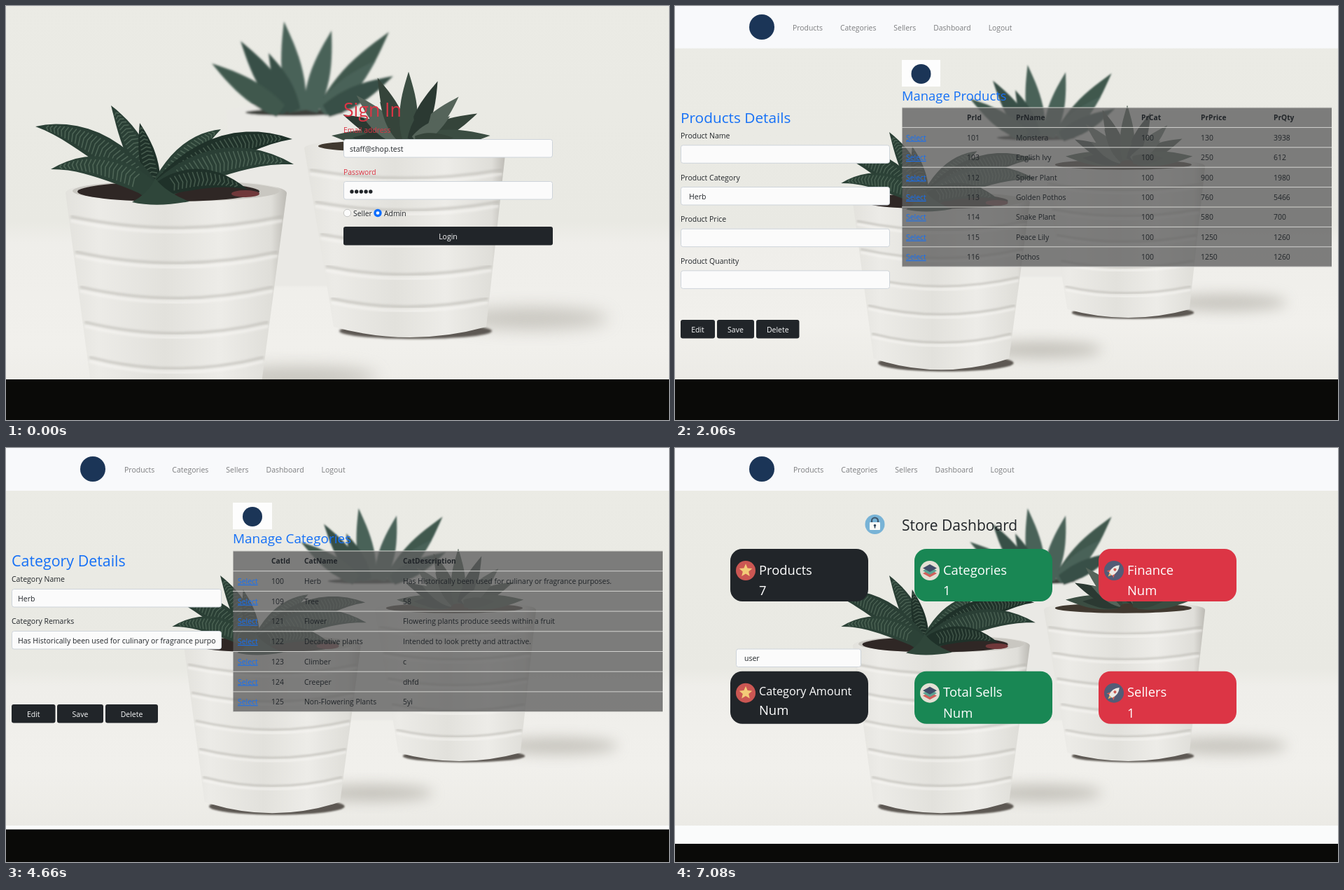
Animation of 947 by 591 pixels, one loop 8 s. Source, as an HTML page:

```html
<!DOCTYPE html>
<html lang="en">
<head>
<meta charset="utf-8">
<title>Plant shop</title>
<style>
html, body { margin: 0; width: 100%; height: 100%; overflow: hidden; background: #0a0a08; }
#stage { display: block; width: 100vw; height: 100vh; font-family: "Open Sans", "Noto Sans", sans-serif; }
</style>
</head>
<body>
<svg id="stage" viewBox="0 0 947 591" preserveAspectRatio="none"></svg>
<script>
const INK = '#212529', BLUE = '#1570f6', RED = '#dc3545', GREEN = '#198754', PALE = '#f8f9fb', NAVY = '#1b3557';
const range = n => [...Array(n).keys()];
const mix = (a, b, t) => a + (b - a) * t;

// Basic shapes
const text = (x, y, size, str, fill = INK, extra = '') =>
  `<text x="${x}" y="${y}" font-size="${size}" fill="${fill}" ${extra}>${str}</text>`;
const box = (x, y, w, h, fill, r = 0, extra = '') =>
  `<rect x="${x}" y="${y}" width="${w}" height="${h}" rx="${r}" fill="${fill}" ${extra}/>`;
const disc = (x, y, r, fill, extra = '') => `<circle cx="${x}" cy="${y}" r="${r}" fill="${fill}" ${extra}/>`;
const oval = (x, y, rx, ry, fill, extra = '') =>
  `<ellipse cx="${x}" cy="${y}" rx="${rx}" ry="${ry}" fill="${fill}" ${extra}/>`;
const path = (d, fill, extra = '') => `<path d="${d}" fill="${fill}" ${extra}/>`;

// A leaf arches from its base to its tip, widest in the lower third
function leaf(x0, y0, x1, y1, arch, fill, stripe) {
  const length = Math.hypot(x1 - x0, y1 - y0), half = 5 + 0.08 * length;
  const cx = mix(x0, x1, 0.5), cy = mix(y0, y1, 0.5) - arch * Math.abs(x1 - x0);
  const side = (t, k) => {
    const dx = mix(cx - x0, x1 - cx, t), dy = mix(cy - y0, y1 - cy, t);
    const w = k * half * Math.sin(Math.PI * mix(0.25, 1, t)) / Math.hypot(dx, dy);
    const x = mix(mix(x0, cx, t), mix(cx, x1, t), t) - dy * w;
    const y = mix(mix(y0, cy, t), mix(cy, y1, t), t) + dx * w;
    return x.toFixed(1) + ' ' + y.toFixed(1);
  };
  const steps = range(13).map(i => i / 12);
  const edge = [...steps.map(t => side(t, 1)), ...steps.reverse().map(t => side(t, -1))];
  let out = path('M' + edge.join('L') + 'Z', fill);
  if (stripe) {
    const gap = 6 / length;
    let d = '';
    for (let t = 0.15; t < 0.9; t += gap) d += `M${side(t, -0.7)}L${side(t + gap / 2, 0.1)}L${side(t, 0.7)}`;
    out += path(d, 'none', `stroke="${stripe}" stroke-width="1.6" opacity=".35"`);
  }
  return out;
}

// Leaves share one heart; spread moves each base toward its tip
const plant = (x, y, tips, { spread = 0, arch = 0, fills, stripe }) => tips.map(([tx, ty], i) =>
  leaf(x + spread * (tx - x), y, tx, ty, arch, fills[i % fills.length], stripe)).join('');
const rosette = (x, y, rx, ry, n) => range(n).map(i => {
  const a = Math.PI * i / (n - 1), r = 1 + 0.08 * Math.sin(i * 5);
  return [x - rx * r * Math.cos(a), y - ry * r * Math.sin(a)];
});

function pot(x, top, rx, ry, bottomX, bottomRx, bottom, dip) {
  const l = bottomX - bottomRx, r = bottomX + bottomRx;
  let out = oval(bottomX + 8, bottom + dip * 0.4, bottomRx, dip * 0.75, '#5d5952', 'filter="url(#soft)"') +
    path(`M${x - rx} ${top}A${rx} ${ry} 0 0 1 ${x + rx} ${top}L${r} ${bottom}Q${bottomX} ${bottom + 2 * dip} ${l} ${bottom}Z`,
      'url(#glaze)');
  for (const k of range(5).map(i => 0.12 + 0.18 * i)) {
    const y = mix(top, bottom, k), from = mix(x - rx, l, k) + 3, to = mix(x + rx, r, k) - 2;
    const ring = (dy, color) => path(`M${from} ${y + dy}Q${x} ${y + dy + dip * 1.6} ${to} ${y + dy}`, 'none',
      `stroke="${color}" stroke-width="4" filter="url(#soft)" opacity=".55"`);
    out += ring(0, '#b9b7b1') + ring(6, '#f9f8f5');
  }
  return out;
}

const defs = `<defs>
  <linearGradient id="wall" x2="0" y2="1">
    <stop stop-color="#ebebe5"/><stop offset=".52" stop-color="#e9e9e3"/>
    <stop offset=".57" stop-color="#efeeea"/><stop offset=".8" stop-color="#f1f0ec"/><stop offset="1" stop-color="#eae9e4"/>
  </linearGradient>
  <linearGradient id="glaze">
    <stop stop-color="#e3e2dd"/><stop offset=".15" stop-color="#ecebe7"/><stop offset=".45" stop-color="#e2e1dc"/>
    <stop offset=".7" stop-color="#edece8"/><stop offset=".93" stop-color="#dfded9"/><stop offset="1" stop-color="#bcbab4"/>
  </linearGradient>
  <filter id="soft"><feGaussianBlur stdDeviation="1.5"/></filter>
  <filter id="hazy" x="-50%" y="-80%" width="200%" height="260%"><feGaussianBlur stdDeviation="12"/></filter>
  <g id="photo">${[
    box(-240, -20, 1210, 630, 'url(#wall)'),
    oval(750, 446, 110, 15, '#aaa79f', 'filter="url(#hazy)" opacity=".6"'),
    oval(420, 530, 110, 14, '#aaa79f', 'filter="url(#hazy)" opacity=".65"'),
    '<g filter="url(#soft)">',
    path('M315 152A90 12 0 0 1 496 152L480 400H340Z', '#eae9e5'),
    oval(412, 152, 70, 5, '#3d3f3a'),
    plant(425, 150, [[465, 35], [335, 50], [547, 37], [397, 22], [375, 67], [294, 82], [528, 78], [553, 100]],
      { spread: 0.25, fills: ['#4a6259', '#374f46', '#40584e'] }),
    '</g>',
    pot(570, 203, 144, 15, 577, 109, 458, 15),
    oval(568, 200, 122, 9, '#40382f'),
    plant(575, 192, [...rosette(575, 185, 110, 85, 9), ...rosette(570, 188, 75, 62, 7)],
      { spread: 0.15, fills: ['#3b4d42', '#2b3932', '#55645a', '#35443a'] }),
    pot(243, 267, 158, 20, 243, 121, 546, 20),
    oval(243, 264, 148, 15, '#c9c7c1'), oval(232, 265, 130, 14, '#2f2725'), oval(342, 268, 20, 5, '#70383a'),
    plant(213, 262, [[150, 142], [191, 167], [307, 176], [42, 172], [409, 190], [64, 233], [411, 226], [345, 262]],
      { spread: 0.04, arch: 0.24, fills: ['#2a3f35', '#1f3129', '#2c4237'], stripe: '#8ca58f' }),
    path('M180 280Q205 266 213 246Q228 266 262 279Q215 288 180 280Z', '#2f463a')
  ].join('')}</g></defs>`;

const photo = (x, y, s) => `<use href="#photo" transform="translate(${x} ${y}) scale(${s})"/>`;
const floor = y => box(0, y, 947, 591 - y, '#0a0a08');

// Page parts
const field = (x, y, w, value = '', pad = 9) =>
  box(x + 0.5, y + 0.5, w - 1, 25.5, '#fbfbfb', 3, 'stroke="#ced4da"') + text(x + pad, y + 17.5, 10.5, value);
const button = (x, y, w, label) =>
  box(x, y, w, 26.5, INK, 3) + text(x + w / 2, y + 17.8, 10.5, label, '#f8f9fa', 'text-anchor="middle"');

const nav = (height, size, x) => box(0, 0, 947, height, PALE) + disc(124, 30, 18, NAVY) +
  text(x, height / 2 + 4.6, size, ['Products', 'Categories', 'Sellers', 'Dashboard', 'Logout']
    .map((s, i) => `<tspan dx="${i && 25}">${s}</tspan>`).join(''), '#7c7d7f');
const badge = (y, w) => box(324, y, w, 38, '#fdfdfd') + disc(324 + w / 2, y + 20, 14, NAVY);

function table(y, pitch, cols, head, rows) {
  let out = box(324.5, y, 613.5, pitch * (rows.length + 1), '#5e5e5e', 0, 'fill-opacity=".78"');
  const row = (cells, i) => cells.map((s, c) => text(cols[c], y + 18.3 + pitch * i, i ? 10.4 : 10.2, s,
    i && !c ? BLUE : INK, i ? (c ? '' : 'text-decoration="underline"') : 'font-weight="700"')).join('');
  out += row(['', ...head], 0) + rows.map((r, i) => row(['Select', ...r], i + 1)).join('');
  for (const i of range(rows.length + 2)) out += box(324, y + pitch * i - 0.5, 614, 1, '#d3d3d0');
  return out;
}

// Dashboard icons, centred on 0,0
const icons = {
  star() {
    const pts = range(10).map(i => {
      const r = i % 2 ? 4.4 : 9.8, a = i * Math.PI / 5;
      return (r * Math.sin(a)).toFixed(1) + ' ' + (-r * Math.cos(a)).toFixed(1);
    });
    return disc(0, 0, 14, '#cb5753') + path('M' + pts.join('L') + 'Z', '#f3cb78');
  },
  stack: () => disc(0, 0, 14, '#e3e0d4') + ['#d0605a', '#5aa393', '#414e68']
    .map((c, i) => path(`M-10 ${4 - 3.7 * i}l10 -5.5l10 5.5l-10 5.5Z`, c)).join(''),
  rocket: () => disc(0, 0, 14, '#535c76') + '<g transform="rotate(45)">' +
    path('M-4 2L-7 8L-2 6ZM4 2L7 8L2 6Z', '#d45f55') + path('M-2 7L0 12L2 7Z', '#f0b45e') +
    path('M0 -11Q7 -3 3 7H-3Q-7 -3 0 -11Z', '#eceae4') + disc(0, -2, 2, '#cf5b54') + '</g>',
  lock: () => disc(0, 0, 14, '#78b3d6') +
    path('M-4.5 -2V-5A4.5 4.5 0 0 1 4.5 -5V-2', 'none', 'stroke="#40566a" stroke-width="2.2"') +
    box(-7.5, -3, 15, 11, '#fbfaf6', 1) + disc(0, 1.5, 1.7, '#33475a') + box(-0.8, 2, 1.6, 3.5, '#33475a')
};
const icon = (name, x, y) => `<g transform="translate(${x} ${y})">${icons[name]()}</g>`;

const looks = [[INK, 'star'], [GREEN, 'stack'], [RED, 'rocket']];
function card([title, value, size = 18.4], i) {
  const [fill, mark] = looks[i % 3], x = 79 + 263 * (i % 3), y = i < 3 ? 144 : 318.7;
  const lift = 18.4 - size;
  return box(x, y, 197, 75, fill, 17) + icon(mark, x + 22, y + 31) +
    text(x + 41, y + 36.5 - lift, size, title, '#fff') + text(x + 41, y + 66 - lift * 1.6, 18.4, value, '#fff');
}

const login = () => [
  photo(0, 0, 1), floor(533),
  text(482, 157.5, 26.6, 'Sign In', RED), text(482, 181, 10.4, 'Email address', RED),
  field(482, 190, 299, 'staff@shop.test'),
  text(482, 240.8, 10.4, 'Password', RED), field(482, 250, 299),
  ...range(5).map(i => disc(494 + 6.7 * i, 265, 2.7, INK)),
  disc(487.5, 295.5, 5.2, '#fbfbfb', 'stroke="#c4c4c2"'), text(496, 300, 10.4, 'Seller'),
  disc(531, 295.5, 5.7, '#0d6efd'), disc(531, 295.5, 2.3, '#fff'), text(540, 300, 10.4, 'Admin'),
  button(482, 315, 299, 'Login')
];

const products = () => [
  photo(186, 66.5, 0.8), nav(60.5, 10.4, 168), floor(533),
  text(8, 167, 20.8, 'Products Details', BLUE),
  ...['Name', 'Category', 'Price', 'Quantity'].map((s, i) =>
    text(8, 189 + 59.7 * i, 10.5, 'Product ' + s) + field(8, 198.3 + 59.7 * i, 299, i === 1 ? 'Herb' : '', 12)),
  button(8, 448, 49, 'Edit'), button(60, 448, 53, 'Save'), button(116, 448, 61.5, 'Delete'),
  badge(77, 55), text(324, 135, 18.4, 'Manage Products', BLUE),
  table(145, 28.4, [330, 417, 487, 666, 751, 855], ['PrId', 'PrName', 'PrCat', 'PrPrice', 'PrQty'], [
    [101, 'Monstera', 100, 130, 3938], [103, 'English Ivy', 100, 250, 612], [112, 'Spider Plant', 100, 900, 1980],
    [113, 'Golden Pothos', 100, 760, 5466], [114, 'Snake Plant', 100, 580, 700],
    [115, 'Peace Lily', 100, 1250, 1260], [116, 'Pothos', 100, 1250, 1260]
  ])
];

const wideNav = () => nav(61, 10.5, 169);
const remark = 'Has Historically been used for culinary or fragrance purposes.';
const categories = () => [
  photo(186, 68.5, 0.8), wideNav(), box(0, 539, 947, 10, '#fafbfb'), floor(544.5),
  text(8, 168.5, 21.4, 'Category Details', BLUE),
  text(8, 190.8, 10.5, 'Category Name'), field(8, 201, 300, 'Herb'),
  text(8, 251, 10.5, 'Category Remarks'), field(8, 261, 300),
  `<svg width="299" height="300">${text(17, 278.5, 10.5, remark)}</svg>`,
  button(8, 366, 62.5, 'Edit'), button(73, 366, 66, 'Save'), button(142, 366, 75, 'Delete'),
  badge(78, 56), text(324, 136, 18.9, 'Manage Categories', BLUE),
  table(147, 28.7, [331, 379, 426, 567], ['CatId', 'CatName', 'CatDescription'], [
    [100, 'Herb', remark], [109, 'Tree', 58], [121, 'Flower', 'Flowering plants produce seeds within a fruit'],
    [122, 'Decarative plants', 'Intended to look pretty and attractive.'], [123, 'Climber', 'c'],
    [124, 'Creeper', 'dhfd'], [125, 'Non-Flowering Plants', '5yi']
  ])
];

const dashboard = () => [
  photo(186, 68.5, 0.8), wideNav(), box(0, 539, 947, 30, '#fafbfb'), floor(565),
  icon('lock', 285.5, 109), text(324, 117.5, 21, 'Store Dashboard'),
  field(87, 286.5, 179, 'user', 12),
  ...[['Products', 7], ['Categories', 1], ['Finance', 'Num'],
    ['Category Amount', 'Num', 16.2], ['Total Sells', 'Num'], ['Sellers', 1]].map(card)
];

const stage = document.getElementById('stage');
const scenes = [login, products, categories, dashboard];
const starts = [0, 500, 3100, 5700];
stage.innerHTML = defs + scenes.map(s => `<g class="scene" display="none">${s().join('')}</g>`).join('');
const groups = [...stage.querySelectorAll('.scene')];

const origin = performance.now();
function tick() {
  const time = (performance.now() - origin) % 8000;
  const current = starts.filter(s => s <= time).length - 1;
  groups.forEach((g, i) => g.setAttribute('display', i === current ? 'inline' : 'none'));
  requestAnimationFrame(tick);
}
tick();
</script>
</body>
</html>
```
